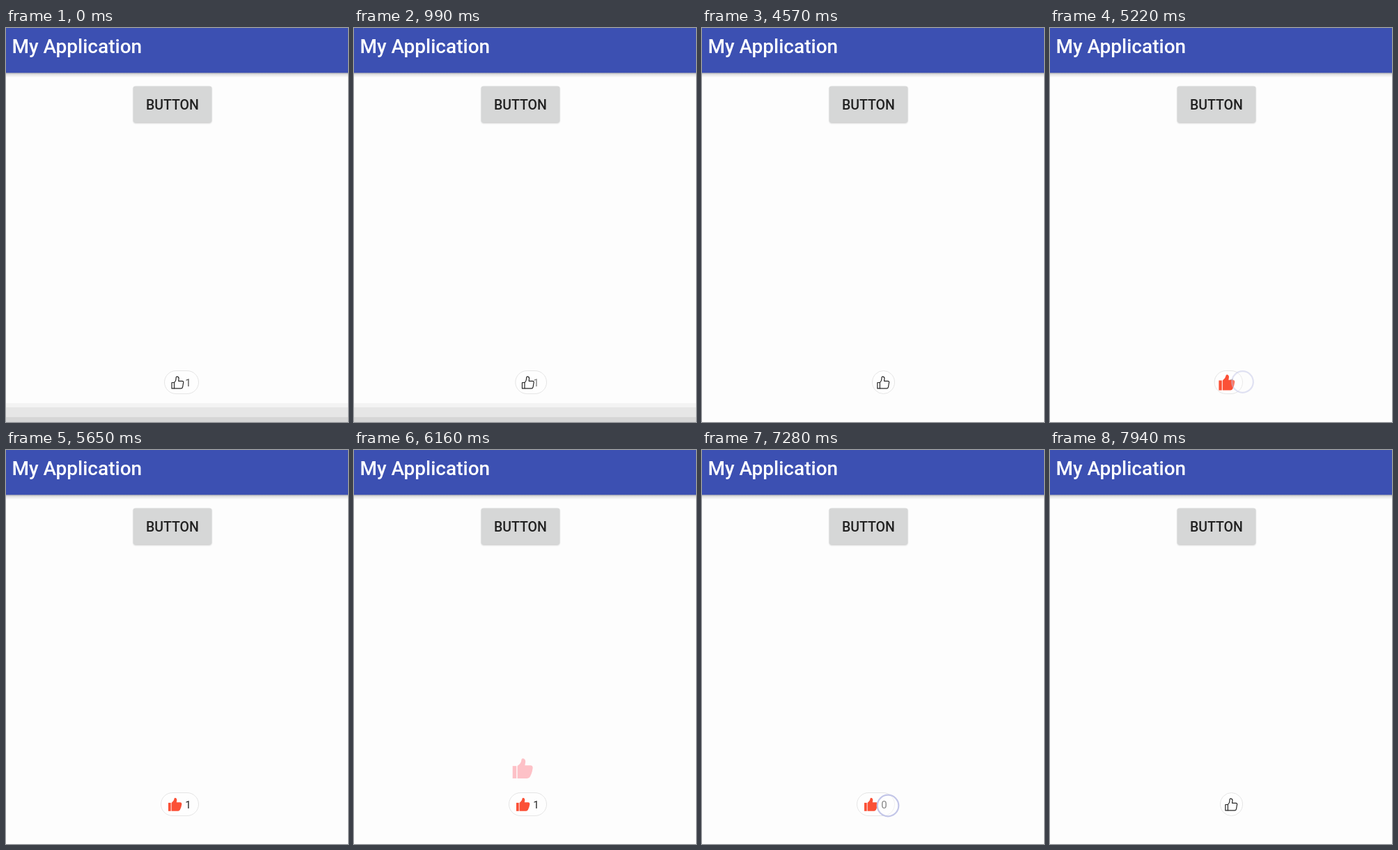
An HTML page that plays this animation: 491 by 565 pixels, repeating every 8 s.

```html
<!DOCTYPE html>
<html lang="en">
<head>
<meta charset="utf-8">
<title>Like button</title>
<style>
  html, body { margin: 0; width: 100%; height: 100%; overflow: hidden; background: #fdfdfd; }
  svg { display: block; width: 491px; height: 565px; }
  text { font-family: Roboto, "Open Sans", sans-serif; }
  .medium { font-weight: 500; }
</style>
</head>
<body>
<svg viewBox="0 0 491 565">
  <defs>
    <linearGradient id="shade" x2="0" y2="1">
      <stop offset="0" stop-color="#000" stop-opacity=".3"/>
      <stop offset=".4" stop-color="#000" stop-opacity=".1"/>
      <stop offset="1" stop-color="#000" stop-opacity="0"/>
    </linearGradient>
    <filter id="soft" x="-10%" y="-10%" width="120%" height="130%">
      <feGaussianBlur stdDeviation="1"/>
    </filter>
    <g id="outline" fill="none" stroke="#262626" stroke-width="1.25" stroke-linejoin="round" transform="translate(.1 .2) scale(.95)">
      <path d="M.8 10.3h3.7v8.9H.8z"/>
      <path d="M4.5 10.3Q7.2 7.8 7.2 4.4V3Q7.4 1.2 9 1.3Q11.6 1.8 11.4 4.6L11 8H16.6Q18.7 8.2 18.4 10.2L17.2 17Q16.8 19.2 14.6 19.2H4.5"/>
    </g>
    <g id="solid">
      <path d="M0 7.4h3.7v11.9H0z"/>
      <path d="M4.6 7.4Q8 5 8.3 2.5Q8.4 .2 10 .2Q12.4 .6 12.3 3.5L11.8 6.8H17Q19.6 7 19.3 9.4Q18.8 14 16.8 17.5Q16 19.3 14 19.3H4.6z"/>
    </g>
  </defs>

  <rect width="491" height="565" fill="#fdfdfd"/>
  <rect y="64" width="491" height="7" fill="url(#shade)"/>
  <rect width="491" height="64.3" fill="#3c50b2"/>
  <text class="medium" x="8.4" y="36" font-size="28" fill="#fff">My Application</text>

  <rect x="183" y="84.5" width="112" height="52" rx="3" fill="#000" opacity=".22" filter="url(#soft)"/>
  <rect x="182.5" y="83.5" width="113" height="52" rx="3" fill="#d6d7d7"/>
  <text class="medium" x="200.9" y="117.4" font-size="19.5" fill="#212121">BUTTON</text>

  <g id="bars">
    <rect y="538" width="491" height="27" fill="#f3f3f3"/>
    <rect y="544" width="491" height="21" fill="#e6e6e6"/>
    <rect y="558" width="491" height="7" fill="#d6d6d6"/>
  </g>

  <rect id="pill" y="491.5" height="33" rx="16.5" fill="#fefefe" stroke="#e5e5e5"/>
  <text id="count" x="257.3" y="513.9" font-size="15" fill="#222"></text>
  <use id="icon" fill="#fb5036"/>
  <use id="floater" href="#solid" fill="#ff4052"/>
  <circle id="ring" r="15.3" fill="#fff" fill-opacity=".45" stroke="#c3c6e8" stroke-width="2.2"/>
</svg>
<script>
const LOOP = 8000;

const taps = [
  { from: 4820, to: 5370, x: 276.5, y: 507.5 },
  { from: 6580, to: 6880, x: 278.5, y: 512.5 },
  { from: 7280, to: 7820, x: 267, y: 510 }
];

const el = id => document.getElementById(id);
const set = (id, attrs) => {
  for (const name in attrs) el(id).setAttribute(name, attrs[name]);
};
const within = (t, from, to) => t >= from && t < to;
const easeOut = k => Math.sin(k * Math.PI / 2);

// Progress 0..1 in n jumps, the first at `from` and the last at `to`.
function jumps(t, from, to, n) {
  if (t < from) return 0;
  const done = Math.floor((t - from) / (to - from) * (n - 1));
  return Math.min(1, (done + 1) / n);
}

// How far the pill is open: 0 is a circle, 1 shows the count.
function openness(t) {
  if (t < 5000) return .77 * (1 - jumps(t, 990, 1360, 4));
  if (t < 7000) return easeOut(jumps(t, 5220, 5650, 4));
  return 1 - jumps(t, 7400, 7940, 5);
}

function drawPill(t) {
  const open = openness(t);
  const liked = within(t, 5070, 7400);
  const x = 251 - 18 * open;
  const scale = liked && t < 5650 ? 1.3 - .3 * open : 1;
  set('pill', { x: 244.5 - 22 * open, width: 32 + 22 * open });
  set('count', { opacity: open });
  el('count').textContent = t < 7280 ? 1 : 0;
  set('icon', {
    href: liked ? '#solid' : '#outline',
    transform: `translate(${x + 9.5} 508.5) scale(${scale}) translate(-9.5 -10)`
  });
}

function drawRing(t) {
  const tap = taps.find(p => within(t, p.from, p.to));
  if (tap) set('ring', { cx: tap.x, cy: tap.y, opacity: t < tap.to - 150 ? 1 : .5 });
  set('ring', { visibility: tap ? 'visible' : 'hidden' });
}

function drawFloater(t) {
  const k = jumps(t, 5800, 6160, 4);
  set('floater', {
    transform: `translate(227.7 ${463.3 - 21.3 * k}) scale(1.5)`,
    opacity: within(t, 5800, 6310) ? .9 - .59 * k : 0
  });
}

const start = performance.now();
function tick() {
  const t = (performance.now() - start) % LOOP;
  drawPill(t);
  drawRing(t);
  drawFloater(t);
  set('bars', { visibility: t < 4570 ? 'visible' : 'hidden' });
  requestAnimationFrame(tick);
}
tick();
</script>
</body>
</html>
```
